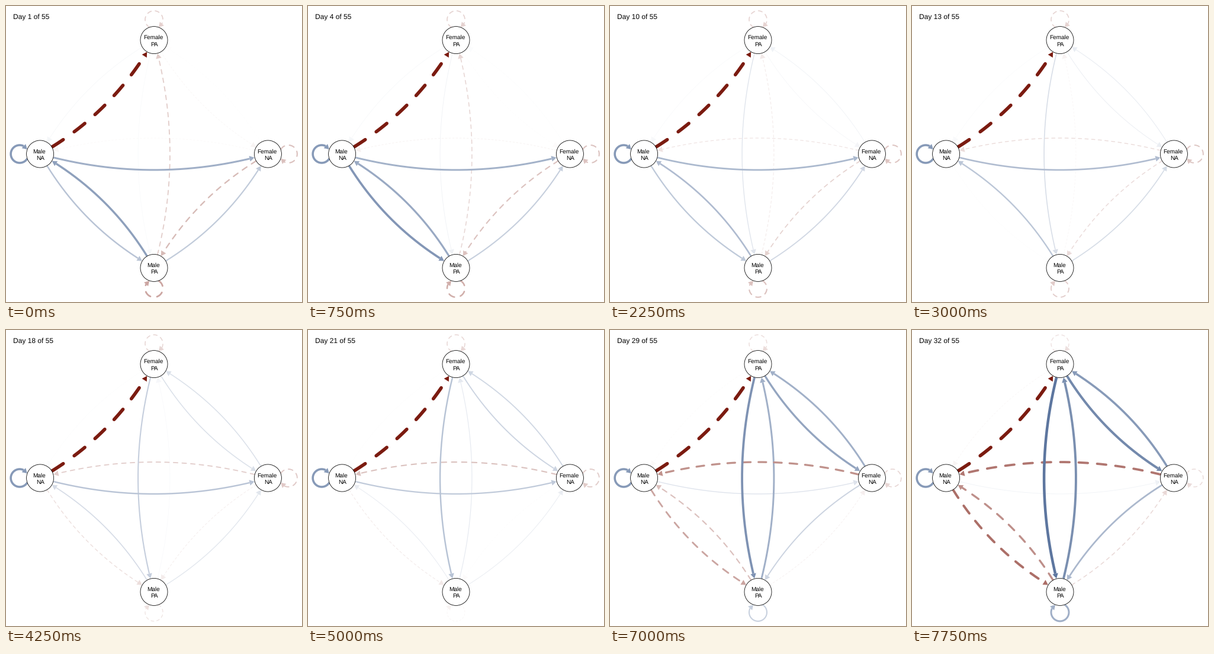
Write a matplotlib script that moves like this. It is 500 by 500 pixels and loops after 8000 ms.

```python
import numpy as np
import matplotlib.pyplot as plt
from matplotlib.animation import FuncAnimation
from matplotlib.patches import Circle, Polygon

SIZE, DPI = 500, 100
PT = 72 / DPI                      # points per pixel
DAYS, TOTAL, STEP = 32, 55, 250

RING, RADIUS = 192.4, 23
LOOP_RADIUS, LOOP_DIST = 15, 34.5
BEND, HEAD, HEAD_HALF = 0.07, 8.5, 4.8
MAX_WIDTH = 5.7
RED = np.array([123, 27, 16]) / 255
BLUE = np.array([33, 68, 124]) / 255

# node: angle on the ring, label lines
NODES = {
    "fp": (-np.pi / 2, "Female", "PA"),
    "fn": (0, "Female", "NA"),
    "mp": (np.pi / 2, "Male", "PA"),
    "mn": (np.pi, "Male", "NA"),
}

# link: signed strength on the first and last day, optional swing between
LINKS = {
    ("mn", "fp"): (-1, -1),
    ("mn", "mn"): (.54, .54),
    ("mn", "fn"): (.43, .07),
    ("mn", "mp"): (.32, -.63, .4),
    ("mp", "mn"): (.51, -.49),
    ("mp", "mp"): (-.39, .43),
    ("mp", "fp"): (-.22, .60),
    ("mp", "fn"): (.28, -.17),
    ("fn", "mp"): (-.30, .38),
    ("fn", "fn"): (-.27, -.16),
    ("fn", "fp"): (-.01, .54),
    ("fn", "mn"): (-.04, -.60),
    ("fp", "fp"): (-.20, -.14),
    ("fp", "mp"): (.04, .73),
    ("fp", "fn"): (-.05, .63),
    ("fp", "mn"): (.05, -.05),
}

plt.rcParams["font.family"] = "Liberation Sans"
plt.rcParams["text.hinting"] = "none"

fig = plt.figure(figsize=(SIZE / DPI, SIZE / DPI), dpi=DPI, facecolor="white")
ax = fig.add_axes([0, 0, 1, 1])
ax.set(xlim=(0, SIZE), ylim=(SIZE, 0))
ax.axis("off")


def polar(angle, r):
    return r * np.stack([np.cos(angle), np.sin(angle)], axis=-1)


def centre(node):
    return SIZE / 2 + polar(NODES[node][0], RING)


def distance(points, origin):
    return np.hypot(*(points - origin).T)


def bow(a, b):
    """Shallow curve between two centres, bent to the right of travel."""
    d = b - a
    ctrl = (a + b) / 2 + 2 * BEND * np.array([-d[1], d[0]])
    t = np.linspace(0, 1, 800)[:, None]
    return (1 - t) ** 2 * a + 2 * t * (1 - t) * ctrl + t ** 2 * b


def loop(node):
    """Clockwise circle beside a node, starting and ending inside it."""
    angle = NODES[node][0]
    t = np.linspace(angle - np.pi, angle + np.pi, 400)
    return centre(node) + polar(angle, LOOP_DIST) + polar(t, LOOP_RADIUS)


def strength(day, first, last, swing=0):
    u = (day - 1) / (DAYS - 1)
    ease = (u + u ** 4) / 2
    wave = (1 - u) * np.sin(3 * np.pi * u)
    return first + (last - first) * ease + swing * wave


class Link:
    def __init__(self, src, dst, trend):
        self.trend = trend
        p, q = centre(src), centre(dst)
        path = loop(src) if src == dst else bow(p, q)
        path = path[(distance(path, p) >= RADIUS) & (distance(path, q) >= RADIUS)]

        # the shaft stops where the arrowhead begins
        spacing = distance(path[-1], path[-2])
        shaft = path[:-int(HEAD / spacing)]
        tip, base = path[-1], shaft[-1]
        along = (tip - base) / distance(tip, base)
        side = HEAD_HALF * np.array([-along[1], along[0]])
        self.line, = ax.plot(*shaft.T, solid_capstyle="butt",
                             dash_capstyle="round")
        self.head = ax.add_patch(Polygon([tip, base + side, base - side], lw=0))

    def update(self, day):
        s = strength(day, *self.trend)
        power = abs(s)
        color = 1 - (1 - (RED if s < 0 else BLUE)) * power
        width = MAX_WIDTH * power ** 0.75
        dash = 4 * max(1, 0.75 / max(width, 0.01))
        self.line.set_linewidth(width * PT)
        self.line.set_linestyle((0, (dash, dash)) if s < 0 else "-")
        self.line.set_color(color)
        self.head.set_facecolor(color)
        for part in (self.line, self.head):
            part.set_visible(power > 0.004)
            part.set_zorder(1 + power)


def label(x, y, text, size, align="center"):
    return ax.text(x, y, text, size=size * PT, ha=align, va="baseline", zorder=6)


links = [Link(src, dst, trend) for (src, dst), trend in LINKS.items()]

for node, (_, group, mood) in NODES.items():
    x, y = centre(node)
    ax.add_patch(Circle((x, y), RADIUS, fc="white", ec="black",
                        lw=0.8 * PT, zorder=5))
    label(x - 1.2, y - 1.2, group, 10)
    label(x + 0.4, y + 10, mood, 10)

title = label(12.3, 22.3, "", 12, "left")


def draw(frame):
    day = frame + 1
    title.set_text(f"Day {day} of {TOTAL}")
    for link in links:
        link.update(day)
    return []


anim = FuncAnimation(fig, draw, frames=DAYS, interval=STEP, repeat=True,
                     repeat_delay=0, blit=False)
plt.show()
```
